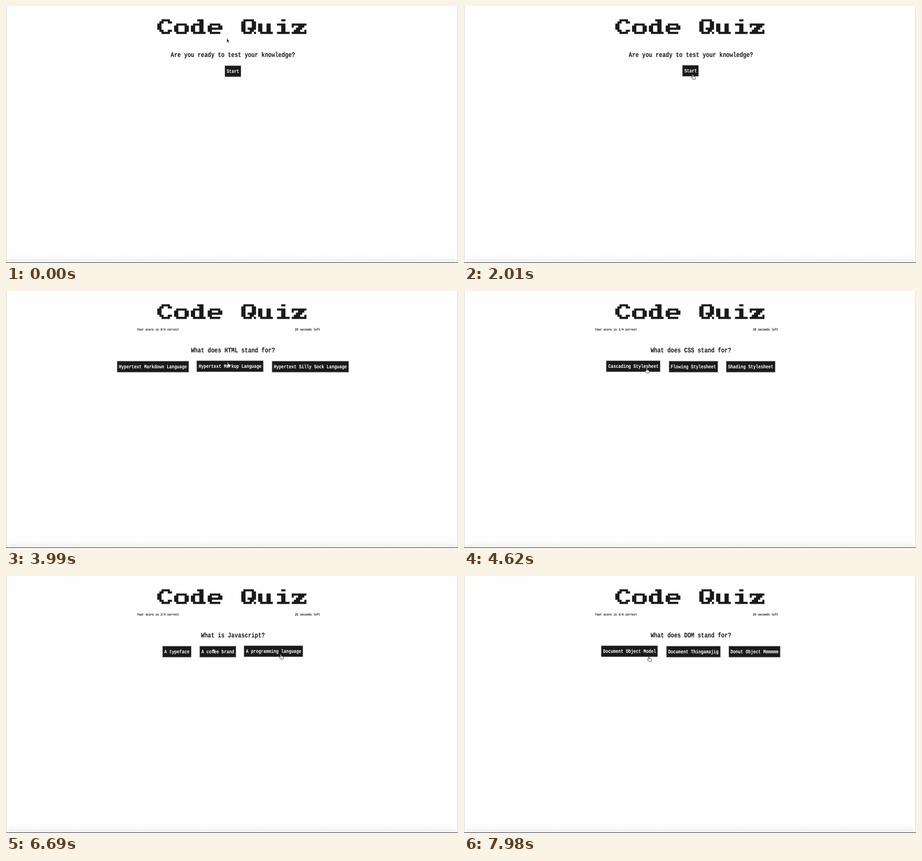
Write an HTML page that moves like this. It is 990 by 565 pixels and loops after 8 s.

```html
<!DOCTYPE html>
<html lang="en">
<head>
<meta charset="utf-8">
<title>Code Quiz</title>
<style>
  html, body { margin: 0; width: 100%; height: 100%; overflow: hidden; background: #fefefe; }
  svg { display: block; width: 100vw; height: 100vh; }
  text {
    font-family: "Liberation Mono", monospace; font-weight: bold;
    fill: #161616; white-space: pre; text-rendering: geometricPrecision;
  }
  .btn text { fill: #fff; }
  .btn rect { fill: #1a1a1a; stroke: #707070; }
</style>
</head>
<body>
<svg viewBox="0 0 990 565">
  <defs>
    <linearGradient id="fade" x1="0" y1="0" x2="0" y2="1">
      <stop offset="0" stop-color="#fefefe"/>
      <stop offset=".5" stop-color="#f9f9f9"/>
      <stop offset="1" stop-color="#ececec"/>
    </linearGradient>
  </defs>
  <rect width="990" height="565" fill="#fefefe"/>
  <rect x="6" y="546" width="978" height="18" fill="url(#fade)"/>
  <path d="M.5 0V564M989.5 0V564" stroke="#cfcfcf"/>
  <rect y="564" width="990" height="1" fill="#1c1c1c"/>
  <g id="title" role="img" aria-label="Code Quiz" fill="#1a1a1a" fill-rule="evenodd"></g>
  <g id="page"></g>
  <g id="cursor" stroke-linejoin="round">
    <path id="arrow" d="M0 0V9L2.1 7.2 3.5 10.4 5 9.7 3.6 6.6H6.2Z" fill="#111" stroke="#fff" stroke-width=".7"/>
    <path id="hand" d="M-1 .9Q0-.7 1 .9V4.2L5 5.2Q6 5.6 5.8 7L5 10.7H-.4L-3.4 6.8Q-3.4 5.4-2 5.8L-1 6.8Z" fill="#fff" stroke="#222" stroke-width=".9"/>
  </g>
</svg>
<script>
const $ = id => document.getElementById(id);
const LOOP = 8000, MID = 497;
const START = 2300, TICK = 900;      // quiz start and length of one countdown second
const BIG = 12.27, MEDIUM = 9.2, SMALL = 6.13;
const ADVANCE = 0.6, TALL = 1.26;    // character width per font size, tall terminal look

// Title letters as outlines on an 8-unit cell
const glyphs = {
  C: 'M2 0H6V1H7V2H5V1H3V2H2V5H3V6H5V5H7V6H6V7H2V6H1V5H0V2H1V1H2z',
  o: 'M1 2H6V3H7V6H6V7H1V6H0V3H1zM2 3V6H5V3z',
  d: 'M3 0H6V6H7V7H1V6H0V3H1V2H4V1H3zM2 3V6H4V3z',
  e: 'M1 2H6V3H7V5H2V6H6V7H1V6H0V3H1zM2 3V4H5V3z',
  Q: 'M1 0H6V1H7V5H6V6H7V7H6V6H5V7H1V6H0V1H1zM2 1V6H4V5H3V4H5V1z',
  u: 'M0 2H2V6H4V2H6V6H7V7H1V6H0z',
  i: 'M3 0H5V1H3zM1 2H5V6H7V7H1V6H3V3H1z',
  z: 'M0 2H7V3H6V4H5V5H4V6H6V5H7V7H0V6H1V5H2V4H3V3H1V4H0z'
};
$('title').setAttribute('transform', 'translate(331.4 29.2) scale(4.6)');
$('title').innerHTML = [...'Code Quiz'].map((c, i) =>
  glyphs[c] ? `<path transform="translate(${i * 8})" d="${glyphs[c]}"/>` : '').join('');

const scenes = [
  { at: 0, ask: 'Are you ready to test your knowledge?', answers: ['Start'], y: 111.6, top: 131.3 },
  { at: START, ask: 'What does HTML stand for?', answers:
    ['Hypertext Markdown Language', 'Hypertext Markup Language', 'Hypertext Silly Sock Language'] },
  { at: 4030, ask: 'What does CSS stand for?', answers:
    ['Cascading Stylesheet', 'Flowing Stylesheet', 'Shading Stylesheet'] },
  { at: 5340, ask: 'What is Javascript?', answers:
    ['A typeface', 'A coffee brand', 'A programming language'] },
  { at: 6930, ask: 'What does DOM stand for?', answers:
    ['Document Object Model', 'Document Thingamajig', 'Donut Object Mmmmmm'] }
];

// Lay the answers out in a centred row; "ff" is a single-width ligature
for (const s of scenes) {
  s.y ??= 134.6;
  s.top ??= 154.3;
  const widths = s.answers.map(a => a.replace('ff', 'f').length * MEDIUM * ADVANCE + 8.3);
  const gap = 17.8;
  let x = MID - (widths.reduce((a, b) => a + b) + gap * (widths.length - 1)) / 2;
  s.buttons = s.answers.map((label, i) => {
    const b = { label, x, w: widths[i] };
    x += b.w + gap;
    return b;
  });
}

// Pointer stops: time, x, y
const stops = [
  [0, 483.5, 71], [60, 483.5, 71], [780, 501.3, 150.3], [2750, 501.3, 150.3],
  [3400, 486, 156.5], [4100, 486, 156.5], [4800, 383.5, 172], [5420, 383.5, 172],
  [6300, 602, 172], [7000, 602, 172], [7560, 418, 186], [7860, 405, 177.2], [LOOP, 405, 177.2]
];

function pointer(t) {
  const i = stops.findIndex(s => s[0] > t);
  const [t0, x0, y0] = stops[i - 1], [t1, x1, y1] = stops[i];
  const u = (t - t0) / (t1 - t0), k = u * u * (3 - 2 * u);
  return [x0 + (x1 - x0) * k, y0 + (y1 - y0) * k];
}

function text(str, x, y, size, anchor = 'start') {
  const tight = `<tspan letter-spacing="${-size * ADVANCE / 2}">ff</tspan>`;
  return `<text transform="translate(${x} ${y}) scale(1 ${TALL})" font-size="${size}" ` +
    `text-anchor="${anchor}">${str.replace('ff', tight)}</text>`;
}

function button(b, top, hover) {
  const lift = hover ? 0.9 : 0;
  return `<g class="btn"><rect x="${b.x + .5 - lift}" y="${top - lift}" width="${b.w - 1}" height="24"/>` +
    text(b.label, b.x + 4.15 - lift / 2, top + 15.6 - lift / 2, MEDIUM) + '</g>';
}

let shown = '';
function draw(t) {
  const n = scenes.findLastIndex(s => t >= s.at), s = scenes[n];
  const [x, y] = pointer(t);
  const over = s.buttons.findIndex(b =>
    x >= b.x - 1 && x <= b.x + b.w && y >= s.top - 1 && y <= s.top + 24.5);

  let html = text(s.ask, MID, s.y, BIG, 'middle') +
    s.buttons.map((b, i) => button(b, s.top, i === over)).join('');
  if (n > 0) {
    html += text(`Your score is ${n - 1}/4 correct`, 287, 87.3, SMALL);
    const ticks = Math.floor((t - START) / TICK);
    if (ticks > 0) html += text(`${30 - ticks} seconds left`, 688, 87.3, SMALL, 'end');
  }
  if (html !== shown) $('page').innerHTML = shown = html;

  $('cursor').setAttribute('transform', `translate(${x.toFixed(2)} ${y.toFixed(2)})`);
  $('arrow').setAttribute('visibility', over < 0 ? 'visible' : 'hidden');
  $('hand').setAttribute('visibility', over < 0 ? 'hidden' : 'visible');
}

const begin = performance.now();
function loop() {
  draw((performance.now() - begin) % LOOP);
  requestAnimationFrame(loop);
}
loop();
</script>
</body>
</html>
```
